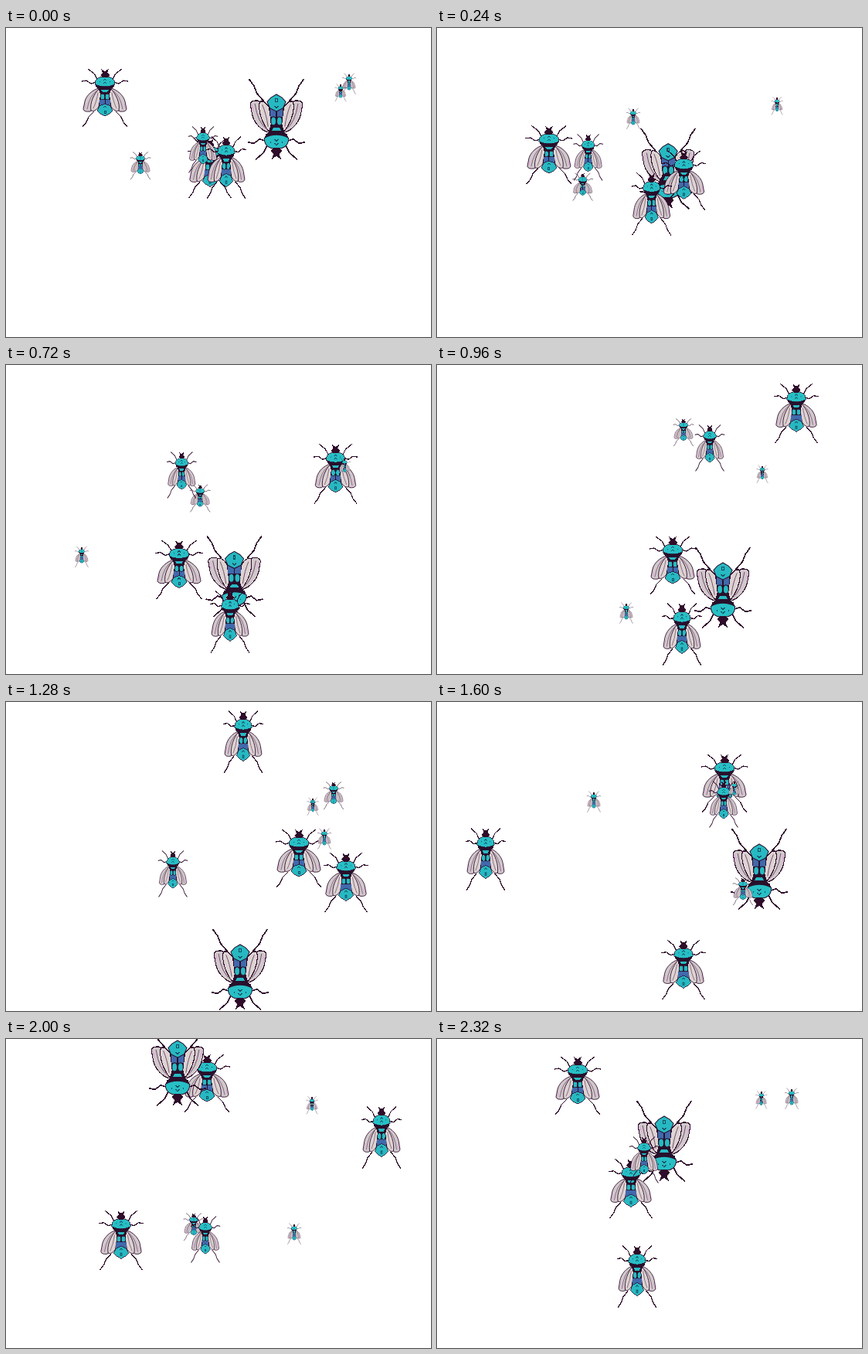
An HTML page that plays this animation: 550x400 px, repeating every 2400 ms.

```html
<!DOCTYPE html>
<html lang="en">
<head>
<meta charset="utf-8">
<title>Buzzing flies</title>
<style>
  html, body { margin: 0; width: 100%; height: 100%; overflow: hidden; background: #fff; }
  #stage { display: block; width: 550px; height: 400px; }
</style>
</head>
<body>
<svg id="stage" viewBox="0 0 550 400" shape-rendering="crispEdges">
  <defs>
    <g id="half" stroke="#2e0c2a" stroke-linejoin="round" stroke-linecap="round">
      <g fill="none" stroke-width="1.3">
        <path d="M-10-24L-14-31L-18-34L-22-37"/>
        <path d="M-11-20L-18-18L-24-22L-30-21"/>
        <path d="M-14 18L-21 25L-24 32L-29 38"/>
      </g>
      <path d="M-8-12C-16-10-24-3-26 5L-28 15Q-27 19-19 18L-12 10Z" fill="#d1c8cc" stroke-width=".9"/>
      <path d="M-8-11C-14-5-20 7-18 17Q-13 19-8 12L-5-4Z" fill="#ddd3d3" stroke-width=".9"/>
      <path d="M-10-9Q-20-3-23 15M-9-6Q-11 6-15 14" fill="none" stroke="#66435f" stroke-width=".7"/>
      <path d="M-25 8L-26 14" fill="none" stroke="#dca6d5"/>
    </g>
    <g id="fly">
      <use href="#half"/>
      <use href="#half" transform="scale(-1 1)"/>
      <path d="M-9-14H9L6-4L8 11H-8L-6-4Z" fill="#28102c"/>
      <path d="M-7 3H-.5V11H-7ZM.5 3H7V11H.5Z" fill="#4169ac"/>
      <path d="M-5-10H5L3-7H-3Z" fill="#27b9c2"/>
      <g fill="#27b9c2" stroke="#28102c" stroke-width=".8">
        <ellipse cx="-3.2" cy="-1" rx="2.8" ry="4"/>
        <ellipse cx="3.2" cy="-1" rx="2.8" ry="4"/>
        <path d="M-7 11L0 8L7 11L10 17L6 21L0 24L-6 21L-10 17Z"/>
      </g>
      <path d="M-2 13L0 11L2 13M-1 17H1V20H-1Z" fill="none" stroke="#174d61"/>
      <path d="M-13-18H13L11-13L6-11H-6L-11-13Z" fill="#28102c"/>
      <path d="M-13-17C-13-25-7-27 0-27C7-27 13-25 13-17Q7-14 0-14Q-7-14-13-17Z" fill="#27bfc5" stroke="#28102c" stroke-width=".8"/>
      <path d="M-7-21H-6M7-21H6M-2-22L0-24L2-22M-2-18L0-20L2-18" fill="none" stroke="#174d61"/>
      <path d="M-6-27L-5-32L0-33L5-32L6-27Z" fill="#d8c8c8"/>
      <path d="M-5-37L0-34L5-37L3-32L6-29L3-26H-3L-6-29L-3-32Z" fill="#2e0c2a"/>
    </g>
  </defs>
</svg>
<script>
const LOOP = 2400, STEP = 80;
const BEATS = [0, 560, 960, 1280, 1600, 2000, 2320];

const circle = (x, y, r) => BEATS.map(t => {
  const a = t / 398 - 1;
  return [x + r * Math.cos(a), y + r * Math.sin(a)];
});

// Back to front: width, height (negative = upside down), one point per beat.
const flies = [
  { w: 62, h: 77, path: [[128,90], [180,248], [305,259], [379,202], [372,105], [260,57], [182,60]] },
  { w: 75, h: -106, path: [[350,119], [257,258], [370,289], [303,347], [417,217], [222,35], [294,133]] },
  { w: 58, h: 78, path: [[264,181], [391,197], [465,62], [440,233], [319,346], [149,260], [251,193]] },
  { w: 27, h: 36, path: [[174,178], [218,219], [319,87], [424,121], [396,245], [243,243]] },
  { w: 39, h: 61, path: [[255,157], [155,170], [353,107], [216,222], [371,132], [258,259], [268,156]] },
  { w: 53, h: 82, path: [[285,180], [275,288], [317,348], [307,51], [63,203], [486,127], [259,307]] },
  { w: 18, h: 27, path: [[444,72], [65,185], [245,321], [412,177], [203,129], [373,252], [459,77]] },
  { w: 15, h: 23, path: circle(416, 110, 31.5) }
];

const stage = document.getElementById('stage');
for (const fly of flies) {
  fly.node = document.createElementNS('http://www.w3.org/2000/svg', 'use');
  fly.node.setAttribute('href', '#fly');
  stage.append(fly.node);
}

function slope(path, i, axis) {
  const a = Math.max(i - 1, 0), b = Math.min(i + 1, path.length - 1);
  return (path[b][axis] - path[a][axis]) / (BEATS[b] - BEATS[a]);
}

// Smooth curve through the points, then straight on after the last one.
function place(path, t, axis) {
  const last = path.length - 1;
  if (t >= BEATS[last]) return path[last][axis] + slope(path, last, axis) * (t - BEATS[last]);
  const i = BEATS.findIndex(beat => beat > t) - 1;
  const span = BEATS[i + 1] - BEATS[i], u = (t - BEATS[i]) / span, v = 1 - u;
  return v * v * (1 + 2 * u) * path[i][axis] + u * u * (3 - 2 * u) * path[i + 1][axis]
    + span * u * v * (v * slope(path, i, axis) - u * slope(path, i + 1, axis));
}

// A fly without a point for the last beat has left by then.
function draw(t) {
  for (const { node, w, h, path } of flies) {
    const gone = t >= BEATS[BEATS.length - 1] && path.length < BEATS.length;
    const x = place(path, t, 0), y = place(path, t, 1);
    node.setAttribute('transform', `translate(${x} ${y}) scale(${w / 62} ${h / 77})`);
    node.setAttribute('visibility', gone ? 'hidden' : 'visible');
  }
}

const start = performance.now();
function tick() {
  const t = (performance.now() - start) % LOOP;
  draw(Math.floor(t / STEP) * STEP);
  requestAnimationFrame(tick);
}
tick();
</script>
</body>
</html>
```
